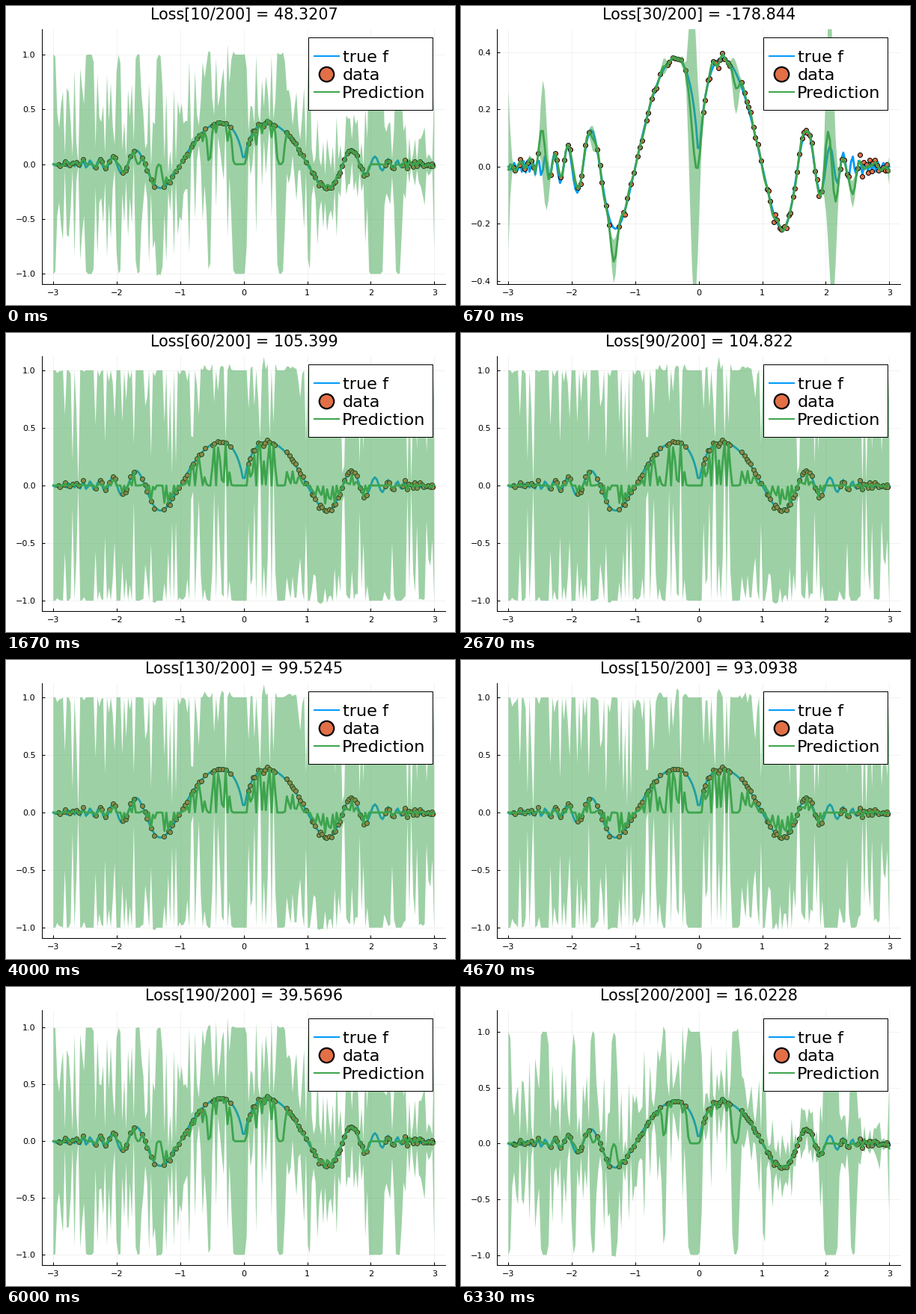
Write a matplotlib script that moves like this. It is 600 px wide and 400 px high and loops after 6.66 s.

```python
import numpy as np
import matplotlib.pyplot as plt
from matplotlib.animation import FuncAnimation
from matplotlib.patches import Rectangle

W, H, DPI = 600, 400, 100
PX = 72 / DPI  # points per pixel
BLUE, ORANGE, GREEN = "#009AFA", "#E36F47", "#3DA44D"
NOISE = 0.01
FRAMES = 20

# Stretches of the x axis that hold training data
SPANS = [(-2.97, -2.52), (-2.36, -2.00), (-1.95, -1.72), (-1.64, -1.39),
         (-1.28, -0.59), (-0.52, -0.21), (0.04, 0.51), (0.65, 0.99),
         (1.05, 1.95), (2.21, 2.37), (2.50, 3.00)]

# Loss at key training steps
LOSS_STEPS = [10, 30, 40, 60, 90, 130, 170, 200]
LOSSES = [48.3207, -178.844, 105.731, 105.399, 104.822, 99.5245, 86.6631, 16.0228]

plt.rcParams["font.family"] = "DejaVu Sans"
rng = np.random.default_rng(4)


def true_f(x):
    a = np.abs(x)
    return np.sinc(a ** a)


def sample_span(start, end):
    """Jittered inputs, packed closer towards the right of the plot."""
    spacing = 0.041 - 0.004 * (start + end) / 2
    count = round((end - start) / spacing)
    cells = np.arange(count) + rng.uniform(0.1, 0.9, count)
    return start + (end - start) * cells / count


def kernel(a, b, scale):
    return np.exp(-0.5 * ((a[:, None] - b[None, :]) / scale) ** 2)


def posterior(scale):
    """Mean and standard deviation of the Gaussian process on the grid."""
    cov = kernel(x_train, x_train, scale) + NOISE ** 2 * np.eye(x_train.size)
    cross = kernel(x_train, grid, scale)
    weights = np.linalg.solve(cov, cross)
    var = 1 - np.sum(cross * weights, axis=0)
    return weights.T @ y_train, np.sqrt(np.clip(var, 0, None))


def training_state(step):
    """Length scale and y limits: a quick rise, a collapse, a slow recovery."""
    if step <= 30:
        t = (step - 10) / 20
        return 0.023 * 4.2 ** t, -1.089 + 0.68 * t ** 2, 1.232 - 0.752 * t ** 2
    left = 200 - step
    return 0.007 + 0.02 * np.exp(-left / 22), -1.087, 1.123 + 0.071 * np.exp(-left / 12)


grid = np.linspace(-3, 3, 200)
x_train = np.concatenate([sample_span(*span) for span in SPANS])
y_train = true_f(x_train) + NOISE * rng.standard_normal(x_train.size)

fig = plt.figure(figsize=(W / DPI, H / DPI), dpi=DPI, facecolor="white")

# Plot area
left, right, top, bottom = 48.1, 587.5, 31, 371.5
ax = fig.add_axes([left / W, 1 - bottom / H, (right - left) / W, (bottom - top) / H])
ax.set_xlim(-3.18, 3.18)
ax.set_xticks(range(-3, 4))
ax.set_axisbelow(True)
ax.grid(color="black", alpha=0.07, linewidth=0.7 * PX)
ax.spines[["top", "right"]].set_visible(False)
ax.spines[["left", "bottom"]].set_linewidth(1 * PX)
ax.tick_params(direction="in", length=4 * PX, width=1 * PX, labelsize=11.1 * PX)
ax.tick_params(axis="x", pad=7.1 * PX)
ax.tick_params(axis="y", pad=8.2 * PX)

ax.plot(grid, true_f(grid), color=BLUE, lw=2.8 * PX, zorder=2)
ax.plot(x_train, y_train, "o", color=ORANGE, ms=6 * PX,
        mec="black", mew=1 * PX, zorder=3)
ribbon, = ax.fill([0, 0, 0], [0, 0, 0], color=GREEN, alpha=0.5, lw=0, zorder=4)
mean_line, = ax.plot([], [], color=GREEN, lw=2.8 * PX, zorder=5)

# Title and legend, laid out in pixels
page = fig.add_axes([0, 0, 1, 1], zorder=5)
page.set_xlim(0, W)
page.set_ylim(H, 0)
page.axis("off")
title = page.text(318.1, 18.3, "", fontsize=20.8 * PX, ha="center", va="baseline")
page.add_patch(Rectangle((403.5, 42), 166.5, 97.2, facecolor="white",
                         edgecolor="black", lw=1 * PX))
for y, color in ((66.5, BLUE), (115, GREEN)):
    page.plot([410.5, 445.5], [y, y], color=color, lw=2 * PX, solid_capstyle="butt")
page.plot([427.7], [91], "o", color=ORANGE, ms=19.5 * PX, mec="black", mew=2.2 * PX)
for x, y, label in ((450.4, 74.6, "true f"), (449.4, 98.9, "data"),
                    (448.3, 123.1, "Prediction")):
    page.text(x, y, label, fontsize=22.4 * PX, va="baseline")


def draw(i):
    step = 10 * (i + 1)
    scale, low, high = training_state(step)
    mean, std = posterior(scale)
    ribbon.set_xy(np.column_stack([
        np.r_[grid, grid[::-1]],
        np.r_[mean + std, (mean - std)[::-1]]]))
    mean_line.set_data(grid, mean)
    gap = 0.2 if high < 0.7 else 0.5
    ax.set_yticks(gap * np.arange(np.ceil(low / gap), np.floor(high / gap) + 1))
    ax.set_ylim(low, high)
    loss = np.interp(step, LOSS_STEPS, LOSSES)
    title.set_text(f"Loss[{step}/200] = {loss:.6g}")
    return ribbon, mean_line, title


anim = FuncAnimation(fig, draw, frames=FRAMES, interval=333, repeat=True,
                     repeat_delay=0, blit=False)
plt.show()
```
